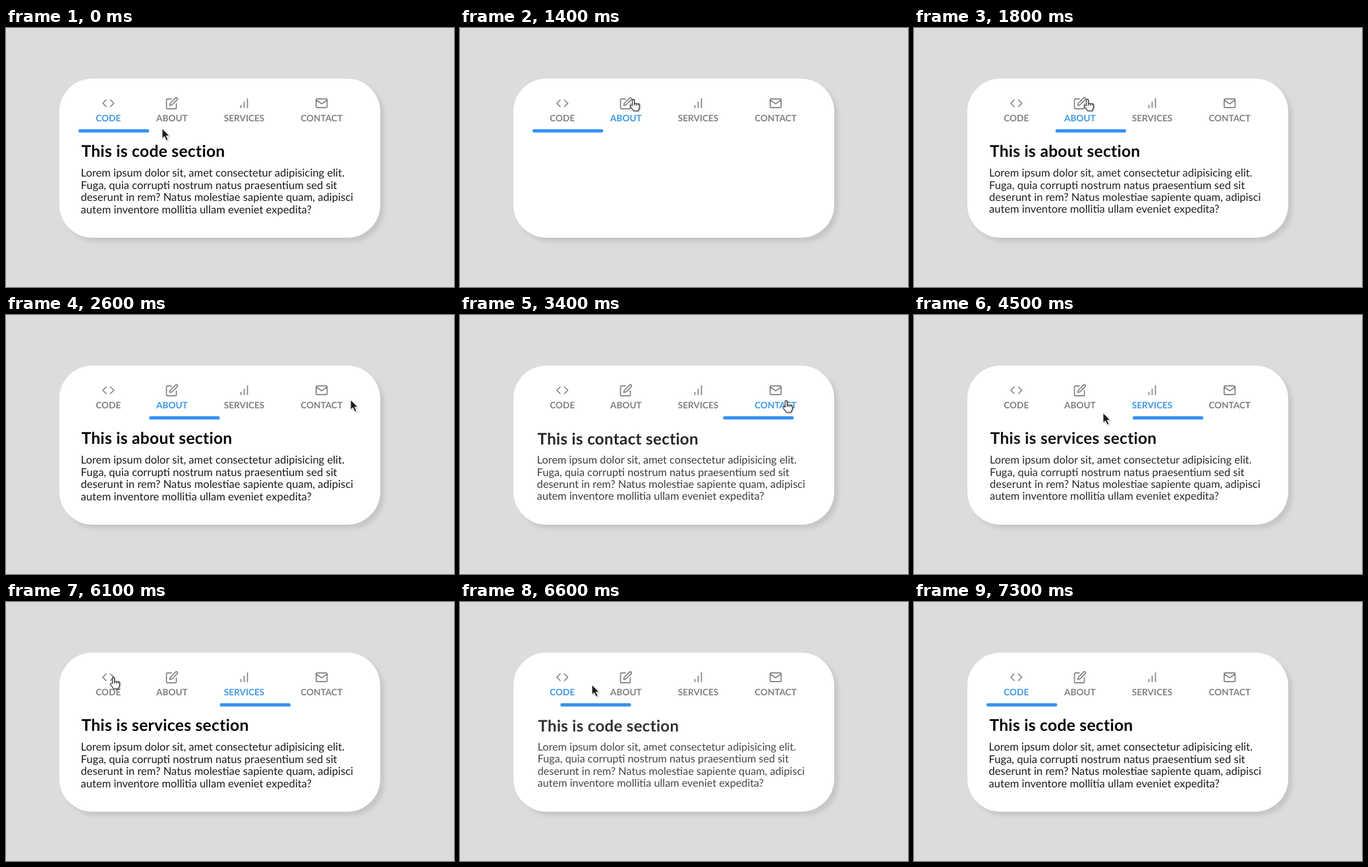
These frames come from a looping animation (680 by 394 pixels, 8.9 s). An HTML page:

```html
<!DOCTYPE html>
<html lang="en">
<head>
<meta charset="utf-8">
<title>Tabs</title>
<style>
  html, body { margin: 0; width: 100%; height: 100%; overflow: hidden; background: #dcdcdc; }
  svg { display: block; width: 680px; height: 394px; }
  text { font-family: Lato, "Open Sans", sans-serif; text-rendering: geometricPrecision; }
  .label { font-size: 13.6px; font-weight: 700; text-anchor: middle; }
  .title { font-size: 24.6px; font-weight: 700; letter-spacing: .28px; }
  .body { font-size: 16.55px; fill: #1a1a1a; }
  .icon { fill: none; stroke: #808080; stroke-width: 2; stroke-linecap: round; stroke-linejoin: round; }
</style>
</head>
<body>
<svg viewBox="0 0 680 394">
  <defs>
    <filter id="soft" x="-10%" y="-10%" width="120%" height="120%"><feGaussianBlur stdDeviation="3"/></filter>
    <filter id="drop" x="-50%" y="-50%" width="200%" height="200%">
      <feDropShadow dx="1" dy="1" stdDeviation="1" flood-opacity=".3"/>
    </filter>
  </defs>
  <rect width="680" height="394" fill="#dcdcdc"/>
  <rect x="87" y="83" width="487" height="242" rx="50" fill="#c6c6c6" filter="url(#soft)"/>
  <rect x="81" y="77" width="487" height="242" rx="50" fill="#fff"/>
  <g id="tabs"></g>
  <rect id="bar" y="154" width="107.3" height="5" rx="2" fill="#3794f2"/>
  <g id="panel">
    <text id="title" class="title" x="114.4" y="196"></text>
  </g>
  <g id="cursor" filter="url(#drop)">
    <path id="arrow" d="M0 0V15L3.5 12L6.3 18L9 17L6.2 11H11Z" fill="#1a1a1a" stroke="#fff" stroke-width=".9"/>
    <path id="hand" d="M-1.5 9V0q1.5-1.4 3 0V6h6q2 0 2 2v4l-2 5h-7l-5-6.5q-.5-2.5 3-1.5zM1.5 6v3M4.5 6v3M7.3 6v3"
      fill="#fff" stroke="#222" stroke-width="1.1" stroke-linejoin="round"/>
  </g>
</svg>
<script>
const LOOP = 8900, STEP = 100, FADE = 500;
const BLUE = '#3d97e6', GRAY = '#808080';
const GAP = 53.6, BAR = 107.3;

const tabs = [
  { name: 'code', width: 38, icon: 'M16 18L22 12L16 6M8 6L2 12L8 18' },
  { name: 'about', width: 48, icon: 'M11 4H4q-2 0-2 2v14q0 2 2 2h14q2 0 2-2v-7M18.5 2.5a2 2 0 0 1 3 3L12 15l-4 1 1-4z' },
  { name: 'services', width: 64, icon: 'M6 20v-4M12 20V10M18 20V4' },
  { name: 'contact', width: 64, icon: 'M4 4h16q2 0 2 2v12q0 2-2 2H4q-2 0-2-2V6q0-2 2-2zM22 6l-10 7L2 6' }
];

const lines = [
  'Lorem ipsum dolor sit, amet consectetur adipisicing elit.',
  'Fuga, quia corrupti nostrum natus praesentium sed sit',
  'deserunt in rem? Natus molestiae sapiente quam, adipisci',
  'autem inventore mollitia ullam eveniet expedita?'
];

const clicks = [
  { at: -FADE, tab: 0 }, { at: 1400, tab: 1 }, { at: 3125, tab: 3 },
  { at: 4160, tab: 2 }, { at: 6350, tab: 0 }
];

// where the pointer's hot spot arrives, and how long it rests there
const stops = [
  { at: 0, x: 237, y: 153 },
  { at: 400, x: 450, y: 255 },
  { at: 1100, x: 263, y: 109, rest: 700 },
  { at: 2600, x: 523, y: 129 },
  { at: 3000, x: 495, y: 131, rest: 500 },
  { at: 4160, x: 364, y: 128 },
  { at: 4500, x: 287, y: 149 },
  { at: 4800, x: 81, y: 165 },
  { at: 5100, x: 130, y: 137, rest: 600 },
  { at: 6100, x: 163, y: 115, rest: 400 },
  { at: 7050, x: 590, y: 240 }
];
const gone = stops[stops.length - 1].at;

const $ = id => document.getElementById(id);
const mix = (a, b, k) => a + (b - a) * k;
const lastBefore = (list, t) => list.filter(e => e.at <= t).length - 1;

function add(parent, tag, attrs, text = '') {
  const el = document.createElementNS('http://www.w3.org/2000/svg', tag);
  for (const k in attrs) el.setAttribute(k, attrs[k]);
  el.textContent = text;
  return parent.appendChild(el);
}

let left = 136.3;
for (const tab of tabs) {
  tab.x = left + tab.width / 2;
  left += tab.width + GAP;
  add($('tabs'), 'path', {
    class: 'icon', d: tab.icon, transform: `translate(${tab.x - 10} 104.5) scale(.8333)`
  });
  tab.label = add($('tabs'), 'text', { class: 'label', x: tab.x, y: 141.5 }, tab.name.toUpperCase());
}
lines.forEach((s, i) => add($('panel'), 'text', { class: 'body', x: 113.6, y: 226.3 + i * 18.4 }, s));

// cubic-bezier(.25, .1, .25, 1)
function ease(x) {
  if (x <= 0) return 0;
  if (x >= 1) return 1;
  const curve = (a, b, u) => 3 * a * u * (1 - u) ** 2 + 3 * b * u * u * (1 - u) + u ** 3;
  let lo = 0, hi = 1;
  for (let i = 0; i < 24; i++) {
    const mid = (lo + hi) / 2;
    if (curve(.25, .25, mid) < x) lo = mid; else hi = mid;
  }
  return curve(.1, 1, lo);
}

function pointer(t) {
  const i = lastBefore(stops, t), a = stops[i], b = stops[i + 1] || a;
  const start = a.at + (a.rest || 0);
  const u = t <= start ? 0 : Math.min(1, (t - start) / (b.at - start));
  const k = u * u * (3 - 2 * u);
  return [mix(a.x, b.x, k), mix(a.y, b.y, k)];
}

function show(id, on) {
  $(id).setAttribute('display', on ? 'inline' : 'none');
}

function draw(t) {
  const n = lastBefore(clicks, t);
  const now = clicks[n].tab, before = clicks[Math.max(0, n - 1)].tab;
  const k = ease((t - clicks[n].at) / FADE);

  tabs.forEach((tab, i) => tab.label.setAttribute('fill', i === now ? BLUE : GRAY));
  $('bar').setAttribute('x', 110 + BAR * mix(before, now, k));
  $('title').textContent = `This is ${tabs[now].name} section`;
  $('panel').setAttribute('opacity', k);
  $('panel').setAttribute('transform', `translate(324.5 235) scale(${mix(.9, 1, k)}) translate(-324.5 -235)`);

  const [x, y] = pointer(t);
  const over = y > 104 && y < 146 && tabs.some(tab => Math.abs(x - tab.x) < tab.width / 2);
  $('cursor').setAttribute('transform', `translate(${x} ${y})`);
  show('cursor', t < gone);
  show('hand', over);
  show('arrow', !over);
}

// ten pictures a second, like a screen recording
const origin = performance.now();
function tick() {
  const t = (performance.now() - origin) % LOOP;
  draw(Math.floor(t / STEP) * STEP);
  requestAnimationFrame(tick);
}
tick();
</script>
</body>
</html>
```
